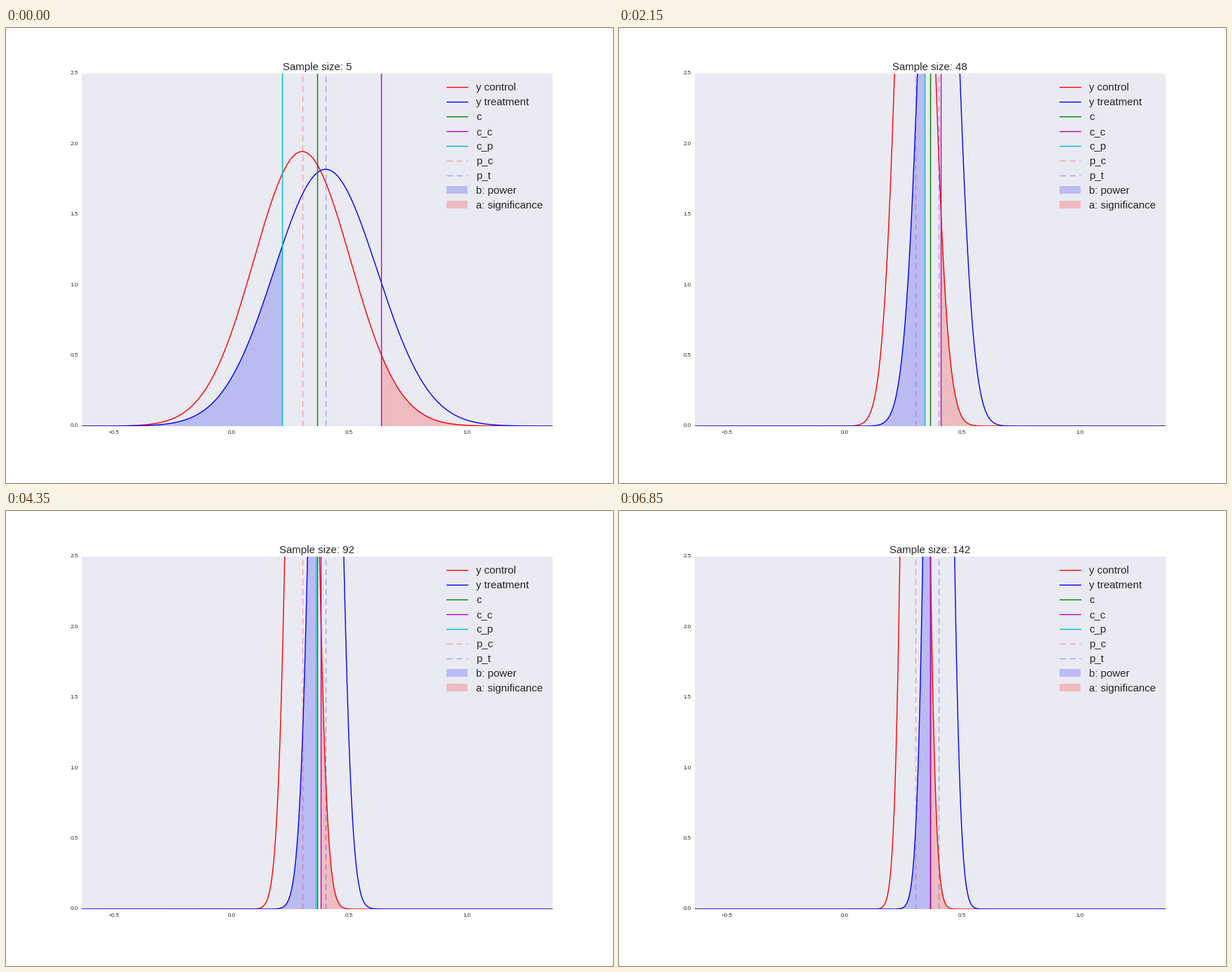
Animation of 864x648 px, one loop 6.9 s. Source, as a matplotlib script:

```python
import numpy as np
import matplotlib.pyplot as plt
from matplotlib.animation import FuncAnimation
from matplotlib.patches import Rectangle

W, H = 864, 648
FRAMES, STEP_MS, FIRST_N = 138, 50, 5
P_C, P_T = 0.3, 0.4
SD_C, SD_T = np.sqrt(P_C * (1 - P_C)), np.sqrt(P_T * (1 - P_T))
Z_ALPHA, Z_BETA = 1.6449, 0.8416
CUT = 0.3635
LW = 1.4
DASHES = (0, (6, 4))

plt.rcParams.update({
    "font.family": "Liberation Sans",
    "text.color": "0.15",
    "xtick.color": "0.15",
    "ytick.color": "0.15",
    "lines.linewidth": LW,
    "lines.solid_capstyle": "round",
    "axes.unicode_minus": True,
})

fig = plt.figure(figsize=(W / 72, H / 72), dpi=72, facecolor="white")
ax = fig.add_axes([0.125, 0.125, 0.775, 0.775], facecolor="#eaeaf2")
ax.set(xlim=(CUT - 1, CUT + 1), ylim=(0, 2.5),
       xticks=np.arange(-0.5, 1.1, 0.5), yticks=np.arange(0, 2.6, 0.5))
ax.tick_params(length=0, pad=5.6, labelsize=8)
for label in ax.get_yticklabels():
    label.set_va("center")
for spine in ax.spines.values():
    spine.set_visible(False)
title = ax.set_title("", fontsize=15, pad=5)

x = np.linspace(CUT - 1, CUT + 1, 1000)


def normal(t, mean, sd):
    return np.exp(-0.5 * ((t - mean) / sd) ** 2) / (sd * np.sqrt(2 * np.pi))


def area_under(lo, hi, mean, sd):
    t = np.linspace(lo, hi, 600)
    return np.vstack([[lo, 0], np.column_stack([t, normal(t, mean, sd)]), [hi, 0]])


def shade(color):
    return ax.fill([0, 0, 0], [0, 0, 0], color=color, alpha=0.2, lw=0)[0]


power, signif = shade("b"), shade("r")
control, = ax.plot(x, 0 * x, "r")
treatment, = ax.plot(x, 0 * x, "b")
line_p = ax.axvline(0, color="c")
ax.axvline(CUT, color="g")
line_c = ax.axvline(0, color="m")
ax.axvline(P_C, color="r", alpha=0.3, ls=DASHES)
ax.axvline(P_T, color="b", alpha=0.3, ls=DASHES)

# Legend, laid out in stage pixels
key = fig.add_axes([0, 0, 1, 1])
key.set(xlim=(0, W), ylim=(H, 0))
key.axis("off")
KEY_X, KEY_Y, PITCH, SIZE = 626.9, 88.8, 21, 15
rows = [("y control", "r", "line"), ("y treatment", "b", "line"), ("c", "g", "line"),
        ("c_c", "m", "line"), ("c_p", "c", "line"),
        ("p_c", "r", "dash"), ("p_t", "b", "dash"),
        ("b: power", "b", "patch"), ("a: significance", "r", "patch")]
for i, (name, color, kind) in enumerate(rows):
    base = KEY_Y + PITCH * i
    if kind == "patch":
        key.add_patch(Rectangle((KEY_X, base - 0.7 * SIZE), 2 * SIZE, 0.7 * SIZE,
                                color=color, alpha=0.2, lw=0))
    else:
        dashed = kind == "dash"
        key.plot([KEY_X, KEY_X + 2 * SIZE], [base - 0.35 * SIZE] * 2, color=color,
                 ls=DASHES if dashed else "-", alpha=0.3 if dashed else 1)
    key.text(KEY_X + 2.8 * SIZE, base, name, fontsize=SIZE, va="baseline")


def update(frame):
    n = FIRST_N + frame
    sd_c, sd_t = SD_C / np.sqrt(n), SD_T / np.sqrt(n)
    c_c = P_C + Z_ALPHA * sd_c
    c_p = P_T - Z_BETA * sd_t
    control.set_ydata(normal(x, P_C, sd_c))
    treatment.set_ydata(normal(x, P_T, sd_t))
    line_c.set_xdata([c_c, c_c])
    line_p.set_xdata([c_p, c_p])
    power.set_xy(area_under(x[0], c_p, P_T, sd_t))
    signif.set_xy(area_under(c_c, x[-1], P_C, sd_c))
    title.set_text(f"Sample size: {n}")
    return control, treatment, line_c, line_p, power, signif, title


anim = FuncAnimation(fig, update, frames=FRAMES, interval=STEP_MS,
                     repeat=True, repeat_delay=0, blit=False)
plt.show()
```
